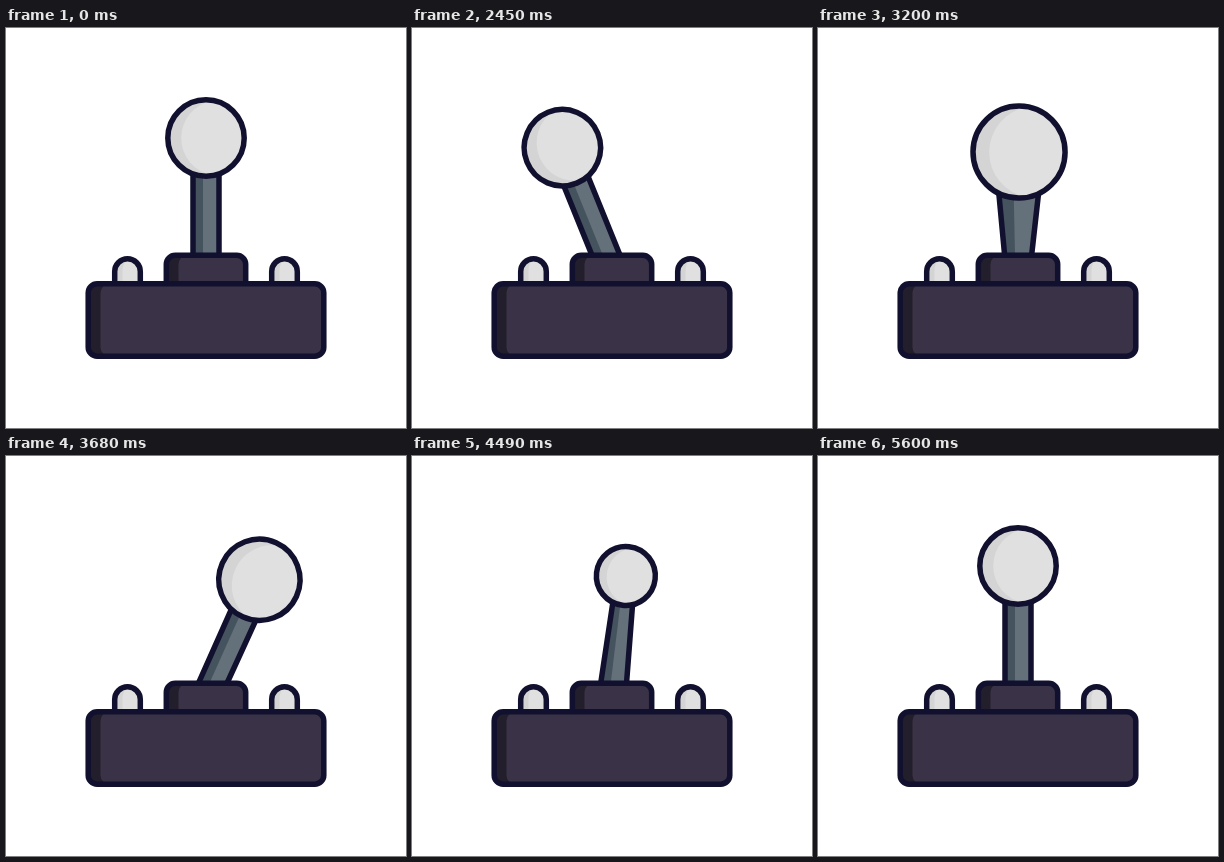
An HTML page that plays this animation: 400 by 400 pixels, repeating every 5660 ms.

```html
<!DOCTYPE html>
<html lang="en">
<head>
<meta charset="utf-8">
<title>Joystick</title>
<style>
html, body { margin: 0; width: 100%; height: 100%; overflow: hidden; background: #fff; }
svg { display: block; width: 100vw; height: 100vh; }

.line { fill: none; stroke: #11102f; stroke-width: 5.5; stroke-linejoin: round; vector-effect: non-scaling-stroke; }
.body { fill: #3a3347; }
.body-dark { fill: #231e2c; }
.pale { fill: #e0e0e0; }
.pale-dark { fill: #d4d4d4; }
.rod { fill: #64707a; }
.rod-dark { fill: #45535e; }

#lever, #ball, #lever path.morph {
  animation-duration: 5660ms;
  animation-iteration-count: infinite;
  animation-timing-function: cubic-bezier(.5, 0, .5, 1);
}
#lever { animation-name: swing; }
#ball { animation-name: reach, grow; }
#lever .rod, #lever .line.morph { animation-name: taper; }
#lever .rod-dark { animation-name: taper-dark; }

/* left, right, then a damped settle */
@keyframes swing {
  0% { rotate: 0deg; }
  35.336% { rotate: 0deg; animation-timing-function: cubic-bezier(.6, 0, .4, 1); }
  45.936% { rotate: -24deg; animation-timing-function: cubic-bezier(.6, 0, .4, 1); }
  67.138% { rotate: 24.8deg; }
  88.339% { rotate: -3.5deg; }
  93.64% { rotate: 3.5deg; }
  97.527% { rotate: -.9deg; }
  98.94%, 100% { rotate: 0deg; }
}
/* apparent lever length */
@keyframes reach {
  0%, 45.936% { translate: 0 -132px; }
  56.537% { translate: 0 -118px; }
  67.138% { translate: 0 -130.5px; }
  77.739% { translate: 0 -122px; }
  84.806%, 100% { translate: 0 -132px; }
}
/* nearer at the front, farther at the back */
@keyframes grow {
  0%, 45.936% { scale: 1; }
  56.537% { scale: 1.205; }
  77.739% { scale: .75; }
  84.806%, 100% { scale: 1; }
}
@keyframes taper {
  0%, 45.936% { d: path("M-13 -10L-13 -100L13 -100L13 -10Z"); }
  56.537% { d: path("M-13 -10L-20 -78L20 -78L13 -10Z"); }
  67.138% { d: path("M-13 -10L-13 -98L13 -98L13 -10Z"); }
  77.739% { d: path("M-13 -10L-9.5 -98L9.5 -98L13 -10Z"); }
  84.806%, 100% { d: path("M-13 -10L-13 -100L13 -100L13 -10Z"); }
}
@keyframes taper-dark {
  0%, 45.936% { d: path("M-13 -10L-13 -100L-3 -100L-3 -10Z"); }
  56.537% { d: path("M-13 -10L-20 -78L-5 -78L-3 -10Z"); }
  67.138% { d: path("M-13 -10L-13 -98L-3 -98L-3 -10Z"); }
  77.739% { d: path("M-13 -10L-9.5 -98L-2.2 -98L-3 -10Z"); }
  84.806%, 100% { d: path("M-13 -10L-13 -100L-3 -100L-3 -10Z"); }
}
</style>
</head>
<body>
<svg viewBox="0 0 400 400">
  <defs>
    <g id="button">
      <path class="pale" d="M-12.8 256V243.5a12.8 12.8 0 0 1 25.6 0V256Z"/>
      <path class="pale-dark" d="M-12.8 256V243.5A12.8 12.8 0 0 1 0 230.7Q-5 235 -5 243.5V256Z"/>
      <path class="line" d="M-12.8 256V243.5a12.8 12.8 0 0 1 25.6 0V256"/>
    </g>
  </defs>

  <g transform="translate(200 242)">
    <g id="lever">
      <path class="rod morph" d="M-13 -10L-13 -100L13 -100L13 -10Z"/>
      <path class="rod-dark morph" d="M-13 -10L-13 -100L-3 -100L-3 -10Z"/>
      <path class="line morph" d="M-13 -10L-13 -100L13 -100L13 -10Z"/>
      <g id="ball">
        <circle class="pale-dark" r="38.2"/>
        <path class="pale" d="M6.5 -37.4A38 38 0 0 1 6.5 37.4A38 38 0 0 1 6.5 -37.4Z"/>
        <circle class="line" r="38.2"/>
      </g>
    </g>
  </g>

  <use href="#button" x="121.5"/>
  <use href="#button" x="278.5"/>

  <path class="body-dark" d="M160.3 256V236.3a9 9 0 0 1 9 -9H190V256Z"/>
  <path class="body" d="M172.5 256V236.3a9 9 0 0 1 9 -9H230.7a9 9 0 0 1 9 9V256Z"/>
  <path class="line" d="M160.3 256V236.3a9 9 0 0 1 9 -9H230.7a9 9 0 0 1 9 9V256"/>

  <rect class="body-dark" x="82.2" y="255.8" width="60" height="72.4" rx="9"/>
  <rect class="body" x="94.5" y="255.8" width="223.3" height="72.4" rx="9"/>
  <rect class="line" x="82.2" y="255.8" width="235.6" height="72.4" rx="9"/>
</svg>
</body>
</html>
```
